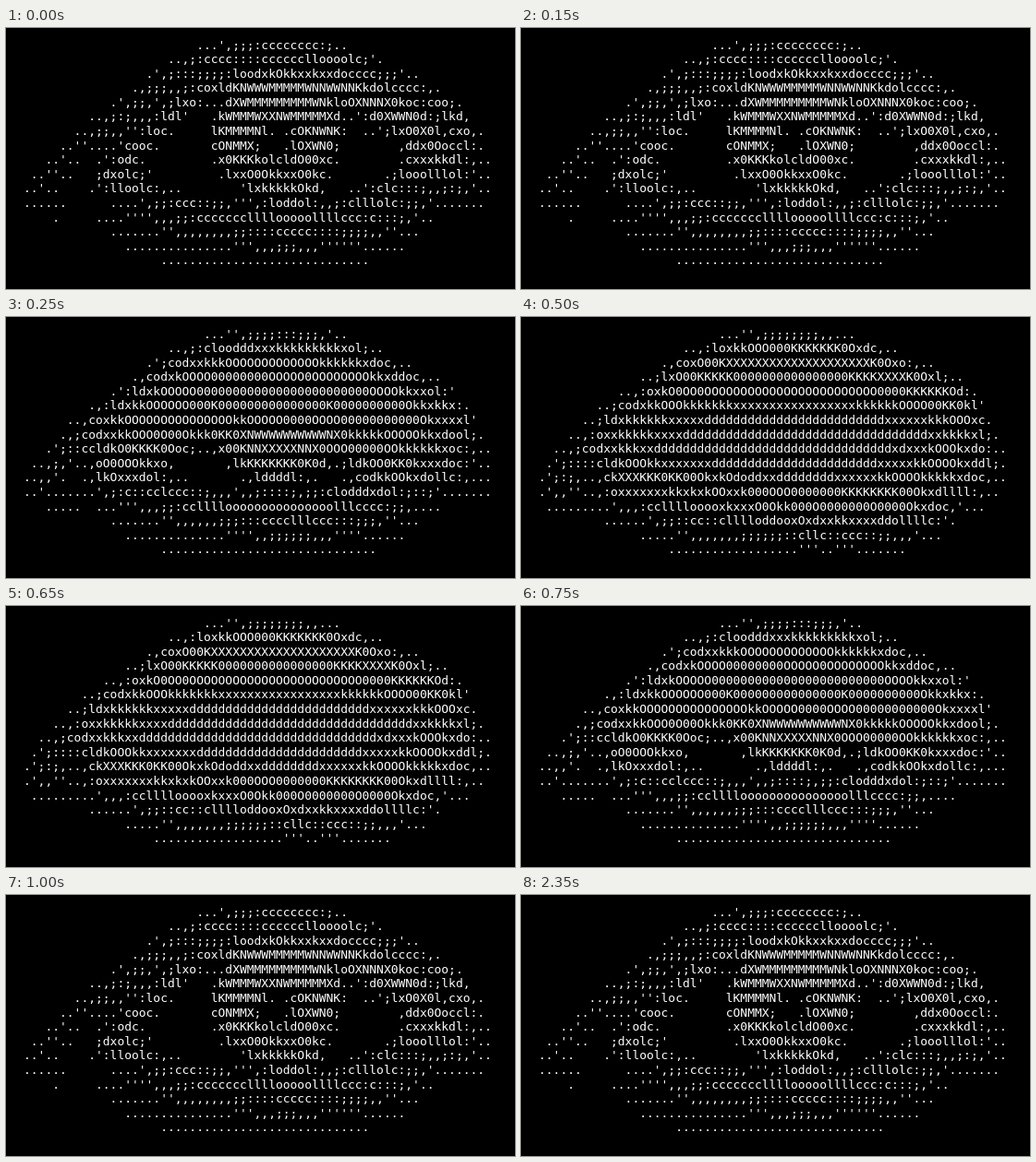
Recreate the animation shown at these times as an HTML page. Size 551 by 283 pixels, loop 3250 ms.

```html
<!DOCTYPE html>
<html lang="en">
<head>
<meta charset="utf-8">
<title>ASCII eye</title>
<style>
html, body { margin: 0; width: 100%; height: 100%; overflow: hidden; background: #000; }
pre {
  position: absolute; left: 19px; top: 10.5px; margin: 0;
  font: 12.96px/15.6px "DejaVu Sans Mono", monospace;
  font-variant-ligatures: none;
  color: #fff; visibility: hidden;
  animation: 3250ms step-end infinite;
}
.open { animation-name: open; }
.half { animation-name: half; }
.shut { animation-name: shut; }
/* One step is 250 ms of 3250 ms. */
@keyframes open { 0%, 30.769% { visibility: visible; } 7.692% { visibility: hidden; } 100% { visibility: visible; } }
@keyframes half { 0%, 15.384%, 30.769%, 100% { visibility: hidden; } 7.692%, 23.076% { visibility: visible; } }
@keyframes shut { 0%, 23.076%, 100% { visibility: hidden; } 15.384% { visibility: visible; } }
</style>
</head>
<body>
<pre class="open">
                        ...',;;;:cccccccc:;..
                    ..,;:cccc::::cccccclloooolc;'.
                 .',;:::;;;;:loodxkOkkxxkxxdocccc;;;'..
               .,;;;,,;:coxldKNWWWMMMMMWNNWWNNKkdolcccc:,.
            .',;;,',;lxo:...dXWMMMMMMMMMWNkloOXNNNX0koc:coo;.
         ..,;:;,,,:ldl'   .kWMMMWXXNWMMMMMXd..':d0XWWN0d:;lkd,
       ..,;;,,'':loc.     lKMMMMNl. .cOKNWNK:  ..';lxO0X0l,cxo,.
     ..''....'cooc.       cONMMX;   .lOXWN0;        ,ddx0Ooccl:.
   ..'..  .':odc.         .x0KKKkolcldO00xc.        .cxxxkkdl:,..
 ..''..   ;dxolc;'         .lxxO0OkkxxO0kc.       .;looolllol:'..
..'..    .':lloolc:,..        'lxkkkkkOkd,   ..':clc:::;,,;:;,'..
......      ....',;;:ccc::;;,''',:loddol:,,;:clllolc:;;,'.......
    .     ....'''',,,;;:cccccccllllooooollllccc:c:::;,'..
            .......'',,,,,,,,;;::::ccccc::::;;;;,,''...
              ...............''',,,;;;,,,''''''......
                   .............................
</pre>
<pre class="half">
                         ...'',;;;;:::;;;,'..
                    ..,;:cloodddxxxkkkkkkkkkxol;..
                 .';codxxkkkOOOOOOOOOOOOOkkkkkkxdoc,..
               .,codxkOOOO00000000OOOOO0OOOOOOOOkkxddoc,..
            .':ldxkOOOOO000000000000000000000000OOOOkkxxol:'
         .,:ldxkkOOOOOO000K000000000000000K0000000000Okkxkkx:.
      ..,coxkkOOOOOOOOOOOOOOOkkOOOOO0000OOOO00000000000Okxxxxl'
     .,;codxxkkOOO0O00Okkk0KK0XNWWWWWWWWWWNX0kkkkkOOOOOkkxdool;.
   .';::ccldkO0KKKK0Ooc;..,x00KNNXXXXXNNX0OOO00000OOkkkkkkxoc:,..
 ..,;,'..,oO0OOOkkxo,       ,lkKKKKKKK0K0d,.;ldkOO0KK0kxxxdoc:'..
..,,'.  .,lkOxxxdol:,..       .,lddddl:,.   .,codkkOOkxdollc:,...
..'.......',;:c::cclccc::;,,,',,;::::;,;;:clodddxdol:;::;'.......
   .....  ...''',,,;;:ccllllooooooooooooooolllcccc:;;,....
            .......'',,,,,,;;;:::cccclllccc:::;;;,''...
              ..............'''',,;;;;;;,,,''''......
                   ..............................
</pre>
<pre class="shut">
                         ...'',;;;;;;;;,,...
                    ..,:loxkkOOO000KKKKKKK0Oxdc,..
                 .,coxO00KXXXXXXXXXXXXXXXXXXXXK0Oxo:,..
              ..;lxO00KKKKK0000000000000000KKKKXXXXK0Oxl;..
           ..,:oxkO0OO0OOOOOOOOOOOOOOOOOOOOOOOO0000KKKKKKOd:.
        ..;codxkkOOOkkkkkkkxxxxxxxxxxxxxxxxxkkkkkkOOOO00KK0kl'
      ..;ldxkkkkkkxxxxxdddddddddddddddddddddddddxxxxxxkkkOOOxc.
    ..,:oxxkkkkkxxxxddddddddddddddddddddddddddddddddddxxkkkkxl;.
  ..,;codxxkkkxxdddddddddddddddddddddddddddddddddxdxxxkOOOkxdo:..
 .';::::cldkOOOkkxxxxxxxdddddddddddddddddddddddxxxxxkkOOOOkxddl;.
.';:;,..,ckXXXKKK0KK00OkxkOdoddxxddddddddxxxxxxkkOOOOkkkkkxdoc,..
.',,''..,:oxxxxxxxkkxkxkOOxxk000OOO0000000KKKKKKKK00Okxdllll:,..
 .........',,,:ccllllooooxkxxxO0Okk000O0000000O0000Okxdoc,'...
         ......',;;::cc::clllloddooxOxdxxkkxxxxddollllc:'.
              .....'',,,,,,,;;;;;;::cllc::ccc::;;,,,'...
                  ..................'''..'''.......
</pre>
</body>
</html>
```
